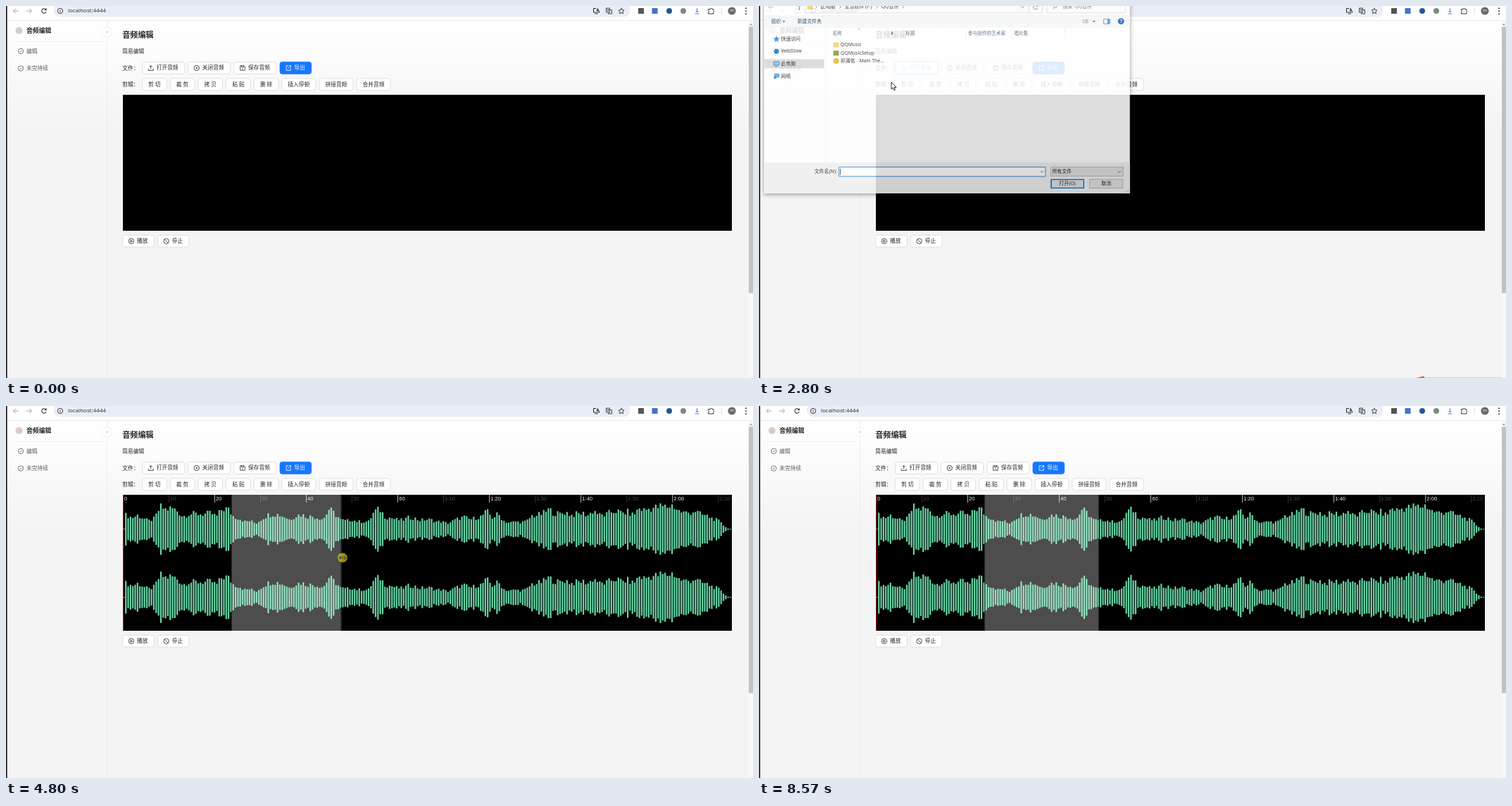
Animation, 1061 px wide and 528 px high, one loop 8.84 s. Source, as an HTML page with a canvas:

```html
<!DOCTYPE html>
<html lang="zh-CN">
<head>
<meta charset="utf-8">
<title>音频编辑</title>
<style>
html, body { margin: 0; width: 100%; height: 100%; overflow: hidden; background: #f5f5f5; }
canvas { display: block; }
</style>
</head>
<body>
<canvas id="stage" width="1061" height="528"></canvas>
<script>
const W = 1061, H = 528, LOOP = 8840;
const UNIT = W / 1920; // one page pixel
const CJK = '"Open Sans","Noto Sans CJK SC","Noto Sans CJK",sans-serif';
const INK = '#262626', SOFT = '#5c5c5c', BLUE = '#1677ff', HOVER = '#4096ff', GREEN = '#66d4a4';
const stage = document.getElementById('stage').getContext('2d');
const layer = Object.assign(document.createElement('canvas'), { width: W, height: H });
const overlay = layer.getContext('2d');
let g = stage;

const clamp = v => Math.max(0, Math.min(1, v));
const during = (t, a, b) => t >= a && t < b;

// ---------- drawing helpers ----------
function rect(x, y, w, h, fill) { g.fillStyle = fill; g.fillRect(x, y, w, h); }

function box(x, y, w, h, r, fill, border) {
  g.beginPath();
  g.roundRect(x, y, w, h, r);
  g.fillStyle = fill;
  g.fill();
  if (border) { g.strokeStyle = border; g.lineWidth = 0.8; g.stroke(); }
}

function dot(x, y, r, fill) {
  g.beginPath();
  g.arc(x, y, r, 0, 7);
  g.fillStyle = fill;
  g.fill();
}

function text(s, x, y, size = 14 * UNIT, color = INK, weight = 400, align = 'left') {
  g.font = `${weight} ${size}px ${CJK}`;
  g.fillStyle = color;
  g.textAlign = align;
  g.textBaseline = 'middle';
  g.fillText(s, x, y + size * 0.07);
}

function icon(d, x, y, color = INK, width = 0.8, fill) {
  const path = new Path2D(d);
  g.save();
  g.translate(x, y);
  if (fill) { g.fillStyle = fill; g.fill(path); }
  g.strokeStyle = color;
  g.lineWidth = width;
  g.lineJoin = 'round';
  g.stroke(path);
  g.restore();
}

const RING = 'M3.7 0A3.7 3.7 0 1 1-3.7 0A3.7 3.7 0 1 1 3.7 0';
const ICONS = {
  upload: 'M-3.5 1V3.5H3.5V1M0 1.5V-3.5M-2-1.5L0-3.5L2-1.5',
  close: RING + 'M-1.3-1.3L1.3 1.3M1.3-1.3L-1.3 1.3',
  save: 'M-3.3-3.3H2L3.3-2V3.3H-3.3ZM-1.5-3.3V-1.3H1.5V-3.3M-1 1.3H1',
  export: 'M0-3.2H-3.2V3.3H3.2V.3M-.6.6L3.3-3.3M.8-3.3H3.3V-.8',
  play: RING + 'M-1.1-1.7L1.8 0L-1.1 1.7Z',
  stop: RING + 'M-2.5-2.5L2.5 2.5',
  check: RING + 'M-1.5-.1L-.3 1.2L1.7-1.1',
  down: 'M-2-1L0 1L2-1',
  star: 'M0-4L1.2-1.3L4-1L1.9.9L2.5 3.8L0 2.3L-2.5 3.8L-1.9.9L-4-1L-1.2-1.3Z',
  puzzle: 'M-4-2.5H-1.2A1.3 1.3 0 0 1 1.4-2.5H3.3V-.3A1.3 1.3 0 0 1 3.3 2V4H-4V2A1.3 1.3 0 0 0-4-.5Z',
  reload: 'M3 1.2A3.2 3.2 0 1 1 2.4-2.2M3.2-3.6V-1.2H.8',
  info: RING + 'M0-.5V2M0-2V-1.2',
  arrow: 'M0 0V10L2.3 8L4 11.6L5.6 10.9L4 7.4H7Z',
  hand: 'M-1 6V1A1 1 0 0 1 1 1V4.5L4.5 5.4Q5.6 5.8 5.4 7L4.8 11H-1.2L-3.8 7.2Q-3.6 5.8-2.4 6.5L-1 7.6Z',
  resize: 'M-4.5 0H4.5M-2.5-2L-4.5 0L-2.5 2M2.5-2L4.5 0L2.5 2'
};

// ---------- cursor ----------
const MOVES = [
  [70, 1046, 517], [270, 498, 295], [410, 500, 297], [640, 527, 317], [900, 514, 290],
  [1230, 487, 275], [2000, 221, 91], [2260, 221, 93], [2500, 221, 93], [2800, 188, 108],
  [3150, 143, 78], [3640, 143, 78], [3840, 374, 226], [3970, 374, 226], [4250, 320, 208],
  [4400, 320, 208], [4830, 480, 215], [4880, 485, 215], [4960, 485, 215], [5290, 250, 108],
  [5620, 250, 108], [6150, 348, 86], [6470, 351, 87], [6540, 352, 87], [7390, 881, 57],
  [7460, 907, 36], [7570, 908, 34], [8430, 1048, 516], [LOOP, 1048, 516]
];

function cursorAt(t) {
  const i = Math.max(1, MOVES.findIndex(m => m[0] > t));
  const [t0, x0, y0] = MOVES[i - 1], [t1, x1, y1] = MOVES[i];
  const p = clamp((t - t0) / (t1 - t0)), e = p * p * (3 - 2 * p);
  return { x: x0 + (x1 - x0) * e, y: y0 + (y1 - y0) * e };
}

function drawCursor(t, c, overButton) {
  if (!during(t, 70, 8570)) return;
  if (during(t, 4420, 4930)) {
    dot(c.x, 215.3, 6.8, 'rgba(240,225,0,.65)');
    icon(ICONS.resize, c.x, 215.3, '#111', 1.8);
    icon(ICONS.resize, c.x, 215.3, '#ddd', 0.6);
  } else {
    icon(overButton && !during(t, 2200, 3700) ? ICONS.hand : ICONS.arrow, c.x, c.y, '#111', 0.9, '#fff');
  }
}

// ---------- browser bar ----------
function drawBrowser() {
  rect(0, 0, W, 20, '#fff');
  box(68, -4, 818.5, 19.5, 9, '#e9eef6');
  rect(0, 20, W, 0.8, '#e3e5e8');
  icon('M4 0H-3.5M-.3-3.2L-3.5 0L-.3 3.2', 14, 7, '#a4a6a9', 1);
  icon('M-4 0H3.5M.3-3.2L3.5 0L.3 3.2', 33, 7, '#a4a6a9', 1);
  icon(ICONS.reload, 54, 7, '#333', 1.1);
  icon(ICONS.info, 77, 7, '#333', 0.9);
  text('localhost:4444', 88, 6.8, 8);
  icon('M0-3.5H-4V2H4V0M-2 4H2M2-4V0M.3-1.5L2 0L3.7-1.5', 838.5, 7, '#333', 1.1);
  icon('M-4-4H1V2H-4ZM1-1.5H4V4H-1V2M-2.8-2H0M-1.4-2V1', 856.5, 7, '#444', 1);
  icon(ICONS.star, 874, 7, '#333', 0.9);
  rect(898, 3, 8, 8, '#555');
  rect(917.5, 3, 8, 8, '#3f74c9');
  dot(942, 7, 4, '#24588f');
  dot(962, 7, 4, '#7d8a80');
  icon('M0-4V2M-2 0L0 2L2 0M-3 4H3', 981.5, 7, '#3f7fd6', 1);
  icon(ICONS.puzzle, 1001.5, 7, '#333', 1);
  rect(1016, 2, 0.8, 10, '#d5dff0');
  dot(1031, 7, 5.6, '#6d6a66');
  text('m', 1031, 6.4, 6, '#fff', 400, 'center');
  [3.2, 7.2, 11.2].forEach(y => dot(1051, y, 1, '#333'));
}

// ---------- page ----------
function button(x, y, w, label, name, state) {
  const primary = state === 'primary';
  const color = primary ? '#fff' : state === 'hover' ? HOVER : INK;
  box(x + 0.4, y + 0.4, w - 0.8, 17, 3.3, primary ? BLUE : '#fff', primary ? BLUE : state === 'hover' ? HOVER : '#d9d9d9');
  if (name) icon(ICONS[name], x + 12.7, y + 9, color);
  text(label, name ? x + 20.7 : x + w / 2, y + 8.9, 14 * UNIT, color, primary ? 500 : 400, name ? 'left' : 'center');
}

// Glow that spreads from a clicked button.
function clickWave(age, x, y, w) {
  if (!during(age, 0, 1000)) return;
  const spread = 6 * UNIT * (1 - (1 - clamp(age / 400)) ** 3);
  box(x - spread, y - spread, w + 2 * spread, 17.7 + 2 * spread, 3.3 + spread,
    `rgba(22,119,255,${0.2 * (1 - age / 1000)})`);
}

function drawPage(t) {
  const shade = g.createLinearGradient(0, 20, 0, 176);
  shade.addColorStop(0, '#fff');
  shade.addColorStop(1, '#f4f4f4');
  rect(0, 20, W, H - 20, shade);

  rect(143.2, 20, 0.7, H, '#e9e9e9');
  rect(8, 50, 131, 0.7, '#e8e8e8');
  dot(18.5, 35, 5, t < 2700 ? '#cfcfcf' : '#dccdc3');
  text('音频编辑', 29, 35, 16 * UNIT, INK, 600);
  [['编辑', 64], ['未完待续', 88.5]].forEach(([label, y]) => {
    icon(ICONS.check, 21, y, SOFT);
    text(label, 29, y, 14 * UNIT, SOFT);
  });
  dot(144, 37, 6.9, '#ececec');
  dot(144, 37, 6.4, '#fff');
  icon('M1-2L-1 0L1 2', 143.7, 37, '#999', 0.7);

  text('音频编辑', 165.3, 41, 20 * UNIT, INK, 600);
  text('简易编辑', 165.3, 64);
  text('文件：', 165.3, 88);
  text('剪辑：', 165.3, 111.5);

  const hover = (a, b) => during(t, a, b) ? 'hover' : '';
  clickWave(t - 2330, 193, 79, 61);
  clickWave(t - 5620, 232.7, 102.4, 35.6);
  button(193, 79, 61, '打开音频', 'upload', hover(1800, 3700));
  button(258.1, 79, 61, '关闭音频', 'close');
  button(323.3, 79, 61, '保存音频', 'save', hover(5980, 6640));
  button(388.6, 79, 45.5, '导出', 'export', 'primary');
  ['剪 切', '裁 剪', '拷 贝', '粘 贴', '删 除'].forEach((label, i) =>
    button(193 + i * 39.7, 102.4, 35.6, label, '', i === 1 ? hover(5230, 5700) : ''));
  ['插入停顿', '拼接音频', '合并音频'].forEach((label, i) =>
    button(391.4 + i * 53.1, 102.4, 48.8, label));
  button(165.3, 324.8, 45.5, '播放', 'play');
  button(215, 324.8, 45.5, '停止', 'stop');
}

function drawEdges() {
  rect(1054.5, 20.8, 6.5, H, '#f8f8f8');
  rect(1055, 29.5, 6, 378, '#c1c1c1');
  icon('M-1.6 1L0-1L1.6 1Z', 1058, 26, '#999', 0.4, '#999');
  rect(0, 0, 1.6, H, '#17171a');
}

// ---------- waveform ----------
const ENVELOPE = [ // half height every 8 px
  22, 18, 22, 17, 13, 17, 35, 31, 33, 29, 20, 24, 24, 24, 24, 25, 20, 32, 32, 20,
  17, 12, 13, 9, 16, 22, 24, 23, 20, 15, 21, 23, 20, 20, 18, 16, 32, 24, 15, 13,
  15, 12, 12, 12, 28, 31, 19, 18, 15, 14, 18, 18, 14, 15, 15, 12, 12, 9, 13, 17,
  19, 15, 18, 20, 28, 18, 24, 13, 10, 12, 11, 12, 21, 22, 25, 31, 25, 24, 27, 22,
  24, 25, 22, 30, 22, 22, 27, 29, 25, 27, 22, 33, 30, 33, 34, 36, 35, 38, 29, 26,
  26, 29, 23, 21, 17, 14, 6, 0, 0
];
const WAVE = { x: 166, y: 126, w: 865, h: 193 };

function barHeight(x, i) {
  const p = Math.max(0, (x - 170) / 8), k = Math.floor(p);
  const h = ENVELOPE[k] + (ENVELOPE[k + 1] - ENVELOPE[k]) * (p - k);
  const noise = Math.sin(i * 12.9898) * 43758.5453;
  return Math.max(0.5, h * (0.72 + 0.36 * (noise - Math.floor(noise))));
}

function drawWave(t, c) {
  rect(WAVE.x, WAVE.y, WAVE.w, WAVE.h, '#000');
  if (t < 3770) return;
  for (let s = 0; s <= 130; s += 10) {
    const x = WAVE.x + s * 6.503, main = s % 20 === 0;
    const label = s > 60 ? `${Math.floor(s / 60)}:${String(s % 60).padStart(2, '0')}` : String(s);
    rect(x, WAVE.y, 0.8, 11, main ? '#ddd' : '#3c3c3c');
    g.font = '7.6px "Liberation Sans",Arial,sans-serif';
    g.fillStyle = main ? '#f2f2f2' : '#484848';
    g.textAlign = 'left';
    g.textBaseline = 'middle';
    g.fillText(label, x + 2, 132);
  }
  const step = 6 * UNIT, barWidth = 4 * UNIT;
  for (const mid of [174.8, 271.5]) {
    rect(WAVE.x, mid - 0.4, 3, 0.8, GREEN);
    for (let i = 1; i * step < WAVE.w - 2; i++) {
      const x = 165.8 + i * step, h = barHeight(x, i);
      rect(x, mid - h, barWidth, h * 2, GREEN);
    }
  }
  rect(WAVE.x, WAVE.y, 0.9, WAVE.h, '#b01818');
  if (t >= 4420) {
    const end = t < 4890 ? Math.min(483, c.x - 1.5) : 483;
    const width = Math.max(0, end - 320);
    g.beginPath();
    g.roundRect(320, WAVE.y, width, WAVE.h, 2 * UNIT);
    g.fillStyle = 'rgba(255,255,255,.3)';
    g.fill();
    [320, end - 1.1].forEach(x => rect(x, WAVE.y, Math.min(1.1, width), WAVE.h, 'rgba(0,0,0,.45)'));
  }
}

// ---------- file dialog ----------
const TRACK = '祁澜佑 - Main Theme';

function dialogBody(t) {
  const chosen = t >= 3200, small = 6.9;
  g.save();
  g.shadowColor = 'rgba(0,0,0,.4)';
  g.shadowBlur = 6;
  g.shadowOffsetY = 2;
  rect(8, -35, 518, 300.5, '#fff');
  g.restore();

  icon('M4 0H-3.5M-.3-3L-3.5 0L-.3 3', 18, 2, '#aaa');
  icon('M0 4V-3.5M-2.5-1L0-3.5L2.5-1', 58, 2, '#555');
  box(66, -6, 317, 16, 0, '#fff', '#d9d9d9');
  box(383, -6, 19, 16, 0, '#fff', '#d9d9d9');
  box(408.5, -6, 111, 16, 0, '#fff', '#d9d9d9');
  rect(69, -2, 8, 7, '#f4cf6b');
  text('此电脑', 88, 1.5, small);
  text('生活软件 (F:)', 122, 1.5, small);
  text('QQ音乐', 174, 1.5, small);
  [82, 116, 168, 205].forEach(x => icon('M-1-1.6L.8 0L-1 1.6', x, 2, '#555', 0.7));
  icon(ICONS.down, 374, 2, '#555');
  icon(ICONS.reload, 392.5, 2, '#555', 0.7);
  icon('M2.5-1A2 2 0 1 1-1.5-1A2 2 0 1 1 2.5-1M-1 .6L-3 3', 420, 2, '#777', 0.7);
  text('搜索"QQ音乐"', 431, 1.5, small, '#6d6d6d');

  rect(8, 13.5, 518, 17.5, '#f5f6f7');
  text('组织', 18, 22, small, '#1e395b');
  text('新建文件夹', 55, 22, small, '#1e395b');
  [36, 475].forEach(x => icon('M-1.7-.7H1.7L0 1Z', x, 22.3, '#444', 0.3, '#444'));
  icon('M-4-2H-2M-4 0H-2M-4 2H-2M-1-2H4M-1 0H4M-1 2H4', 463, 22, '#777', 0.7);
  box(489, 19, 8.5, 6.5, 0, '#fff', '#3a77b5');
  rect(494, 19, 3.5, 6.5, '#4a9be0');
  dot(513.5, 22, 4.4, '#1769b5');
  text('?', 513.5, 21.7, 6.5, '#fff', 700, 'center');

  rect(95, 31, 0.6, 191, '#e8e8e8');
  rect(8, 75.5, 85, 13, '#d9d9d9');
  icon(ICONS.star, 25.5, 47, '#2f86d6', 0.4, '#2f86d6');
  dot(25.5, 64.5, 3.6, '#1580d8');
  box(21.5, 79, 8, 5, 0, '#7cc4f0', '#3f6f99');
  rect(23.5, 85, 4, 0.9, '#3f6f99');
  box(23, 96.5, 6, 4.5, 0, '#5eaee8', '#2f75b0');
  dot(23.5, 101.5, 2, '#3b8dd0');
  text('快速访问', 32, 46.7, small);
  text('VeloStow', 32, 64.3, small);
  text('此电脑', 32, 81.8, small);
  text('网络', 32, 99.3, small);

  icon('M-2 1L0-1L2 1', 142.5, 33, '#888', 0.6);
  [['名称', 105], ['#', 187], ['标题', 208.5], ['参与创作的艺术家', 297], ['唱片集', 362]]
    .forEach(([label, x]) => text(label, x, 39, 6.6, '#4c607a'));
  [183, 204, 293, 358, 434].forEach(x => rect(x, 32, 0.6, 15, '#e3e3e3'));
  if (t >= 3080) rect(100, 73, 332, 11.5, chosen ? '#cce8ff' : '#e5f3ff');
  rect(106, 52, 8, 7, '#f6d271');
  rect(106, 63.5, 8, 7, '#8b9a3d');
  dot(110, 78, 4, '#e3b92e');
  text('QQMusic', 116.3, 55.3, small);
  text('QQMusicSetup', 116.3, 66.8, small);
  text(TRACK.slice(0, -2) + '...', 116.3, 78.2, small);

  rect(8, 222, 518, 43.5, '#f0f0f0');
  text('文件名(N):', 111, 234.5, small, INK, 400, 'right');
  box(114, 228.3, 292.5, 13.2, 0, '#fff', '#0078d7');
  if (chosen) text(TRACK, 116.5, 234.5, small);
  else rect(115.5, 230.5, 0.7, 9, '#111');
  box(414, 228.3, 102.5, 12.8, 0, '#e1e1e1', '#adadad');
  text('所有文件', 416, 234.3, small);
  icon(ICONS.down, 401.5, 235, '#444', 0.8);
  icon(ICONS.down, 511, 235, '#444', 0.8);
  box(414.6, 246, 46.2, 12, 0, '#e1e1e1', '#0078d7');
  g.lineWidth = 1.3;
  g.stroke();
  box(469, 245.6, 47, 12.6, 0, '#e1e1e1', '#adadad');
  text('打开(O)', 437.5, 251.7, small, INK, 400, 'center');
  text('取消', 492.5, 251.7, small, INK, 400, 'center');
  icon('M2-2L-2 2M2 0L0 2', 522.5, 262, '#aaa', 0.7);
}

function drawDialog(t) {
  if (!during(t, 2680, 3630)) return;
  const opening = clamp((t - 2680) / 140), closing = clamp((t - 3430) / 200);
  const scale = closing ? 1.012 - 0.05 * closing : 0.945 + 0.067 * opening;
  overlay.setTransform(1, 0, 0, 1, 0, 0);
  overlay.clearRect(0, 0, W, H);
  overlay.translate(267, 115);
  overlay.scale(scale, scale);
  overlay.translate(-267, -115);
  g = overlay;
  dialogBody(t);
  g = stage;
  g.globalAlpha = opening * (1 - closing);
  g.drawImage(layer, 0, 0);
  g.globalAlpha = 1;
}

function drawTray(t) {
  if (!during(t, 2700, 3450)) return;
  icon('M0 2L12-1L14 2Z', 932, 526.5, '#e2691e', 0.3, '#e2691e');
  rect(946, 527, 110, 1, '#d4d4d4');
}

function frame(now) {
  const t = now % LOOP, c = cursorAt(t);
  const overButton = during(t, 1800, 3700) || during(t, 5230, 5700) || during(t, 5980, 6640);
  drawPage(t);
  drawBrowser();
  drawWave(t, c);
  drawEdges();
  drawDialog(t);
  drawTray(t);
  drawCursor(t, c, overButton);
  requestAnimationFrame(frame);
}
requestAnimationFrame(frame);
</script>
</body>
</html>
```
